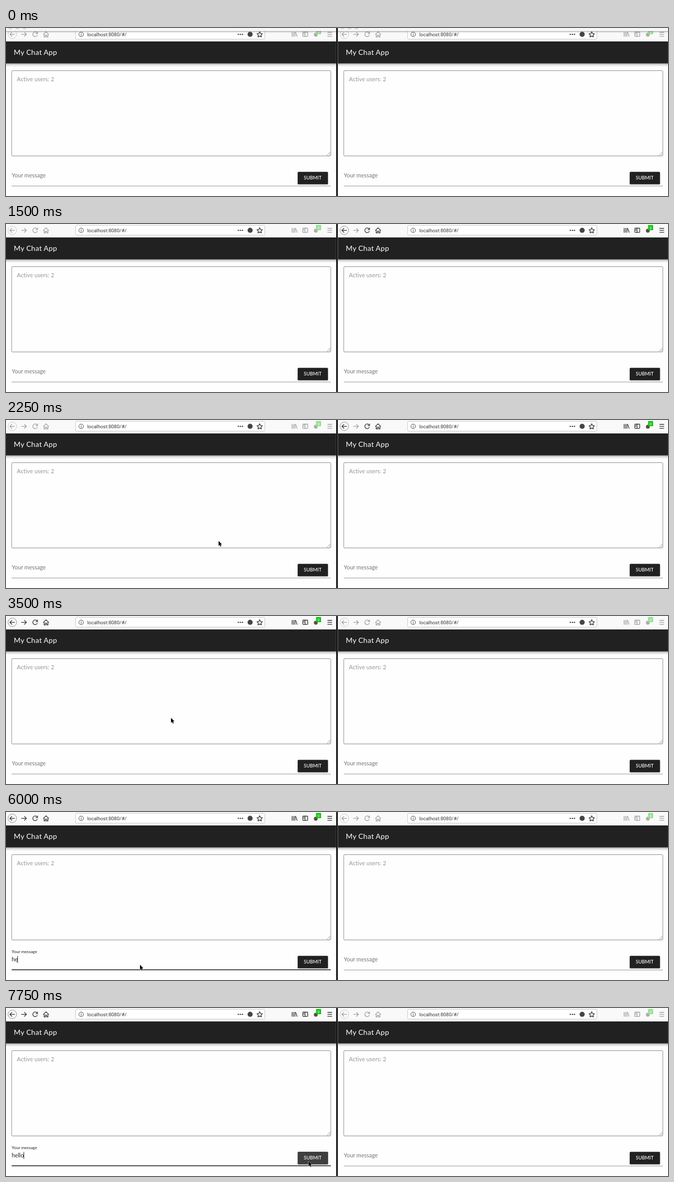
An HTML page that plays this animation: 1280x325 px, repeating every 8 s.

```html
<!DOCTYPE html>
<html lang="en">
<head>
<meta charset="utf-8">
<title>Chat app demo</title>
<style>
html, body { margin: 0; width: 100%; height: 100%; overflow: hidden; background: #fefefe; }
svg { display: block; width: 1280px; height: 325px; }
text { font-family: Lato, sans-serif; font-size: 11px; }
.line { fill: none; stroke: #333; stroke-width: 1.3; }
.title { font-size: 14px; letter-spacing: .3px; fill: #fff; }
.url { font-family: Roboto, sans-serif; font-size: 9.5px; fill: #333; }
.users { fill: #949494; letter-spacing: .1px; }
.label { fill: #757575; }
.submit { font-size: 9.2px; font-weight: 500; fill: #fff; text-anchor: middle; }

.anim { animation: 8s step-end infinite; }
.strip { animation-name: strip; }
.left-tools { animation-name: left-tools; }
.right-tools { animation-name: right-tools; }
.float { animation-name: float; }
.focus { animation-name: focus; transform-origin: 319.5px 0; }
.he { animation-name: he; }
.ll { animation-name: ll; }
.o { animation-name: o; }
.caret { animation-name: caret; }
.hover { animation-name: hover; }
.cursor { animation-name: cursor; }

@keyframes strip {
  0% { transform: none; }
  3.125% { transform: translateY(-3px); }
  6.25%, 100% { transform: translateY(-12px); }
}
@keyframes left-tools { 0% { opacity: .45; } 34.375%, 100% { opacity: 1; } }
@keyframes right-tools {
  0% { opacity: .45; }
  15.625% { opacity: 1; }
  34.375%, 100% { opacity: .45; }
}
@keyframes float {
  0% { transform: translate(11px, 289px); fill: #757575; }
  59.375% { transform: translate(11px, 279px) scale(.85); fill: #444; }
  62.5%, 100% { transform: translate(11px, 273px) scale(.75); fill: #212121; }
}
@keyframes focus {
  0% { transform: scaleX(0); }
  59.375% { transform: scaleX(.6); }
  62.5%, 100% { transform: none; }
}
@keyframes he { 0% { fill: transparent; } 75%, 100% { fill: #212121; } }
@keyframes ll { 0% { fill: transparent; } 78.125%, 100% { fill: #212121; } }
@keyframes o { 0% { fill: transparent; } 81.25%, 100% { fill: #212121; } }
@keyframes caret {
  0% { opacity: 0; transform: translateX(11px); }
  62.5% { opacity: 1; transform: translateX(11px); }
  75% { opacity: 1; transform: translateX(22px); }
  78.125% { opacity: 1; transform: translateX(28px); }
  81.25%, 100% { opacity: 1; transform: translateX(34px); }
}
@keyframes hover { 0% { opacity: 0; } 93.75%, 100% { opacity: 1; } }
@keyframes cursor {
  0% { opacity: 0; transform: translate(411px, 234px); }
  28.125% { opacity: 1; transform: translate(411px, 234px); }
  31.25% { opacity: 1; transform: translate(385px, 254px); }
  34.375% { opacity: 1; transform: translate(340px, 264px); }
  37.5% { opacity: 1; transform: translate(306px, 240px); }
  40.625% { opacity: 1; transform: translate(314px, 206px); }
  43.75% { opacity: 1; transform: translate(319px, 197px); }
  46.875% { opacity: 1; transform: translate(312px, 212px); }
  50% { opacity: 1; transform: translate(290px, 250px); }
  53.125% { opacity: 1; transform: translate(264px, 288px); }
  56.25% { opacity: 1; transform: translate(255.5px, 300.5px); }
  65.625% { opacity: 1; transform: translate(257.5px, 298px); }
  68.75% { opacity: 1; transform: translate(259px, 295.5px); }
  87.5% { opacity: 1; transform: translate(300px, 294px); }
  90.625% { opacity: 1; transform: translate(430px, 292px); }
  93.75% { opacity: 1; transform: translate(566px, 295px); }
  96.875%, 100% { opacity: 1; transform: translate(585px, 296.5px); }
}
</style>
</head>
<body>
<svg viewBox="0 0 1280 325">
  <defs>
    <linearGradient id="shade" x2="0" y2="1">
      <stop stop-opacity=".36"/>
      <stop offset=".4" stop-opacity=".12"/>
      <stop offset="1" stop-opacity="0"/>
    </linearGradient>

    <g id="window">
      <rect width="638.5" height="325" fill="#fefefe"/>
      <rect width="638.5" height="26" fill="#f9f9fa"/>
      <rect x="134.5" y="2.5" width="366" height="19" rx="2" fill="#fff" stroke="#c8c8c8"/>
      <circle class="line" cx="145.3" cy="12.3" r="4.4" style="stroke-width:.9"/>
      <path class="line" d="M145.3 9.6v1.1m0 1v3.2" style="stroke-width:1"/>
      <text class="url" x="157" y="16">localhost:8080/#/</text>
      <g fill="#444">
        <circle cx="449.2" cy="12.3" r="1.3"/>
        <circle cx="453.2" cy="12.3" r="1.3"/>
        <circle cx="457.2" cy="12.3" r="1.3"/>
        <circle cx="472" cy="12.2" r="4.9"/>
      </g>
      <path class="line" stroke-linejoin="round" d="M490.5 7.2l1.6 3.4 3.7.5-2.7 2.6.7 3.7-3.3-1.8-3.3 1.8.7-3.7-2.7-2.6 3.7-.5z"/>

      <rect y="26" width="638.5" height="42.5" fill="#212121"/>
      <rect y="68.5" width="638.5" height="7" fill="url(#shade)"/>
      <text class="title" x="15" y="52">My Chat App</text>

      <rect x="11" y="82.5" width="617" height="165" rx="2" fill="#fefefe" stroke="#8c8c8c"/>
      <path class="line" d="M620.5 246.5l7-7m-3 7l3-3" style="stroke:#777;stroke-width:.8"/>
      <text class="users" x="21" y="103">Active users: 2</text>

      <path d="M11 305.7H628" stroke="#949494"/>
      <rect x="563.5" y="279.5" width="59.5" height="24" rx="2" opacity=".22"/>
      <rect x="564" y="278.3" width="58.5" height="24" rx="1.5" fill="#212121"/>
      <text class="submit" x="593" y="293.2">SUBMIT</text>
    </g>

    <path id="forward" class="line" d="M29.5 12.3h10m-4.2-4.2l4.2 4.2-4.2 4.2"/>

    <g id="tools">
      <circle class="line" cx="12.2" cy="12.2" r="8.3" style="stroke:#777;stroke-width:.8"/>
      <path class="line" d="M17 12.3H7.5m4.2-4.2l-4.2 4.2 4.2 4.2"/>
      <path class="line" d="M60 9.6a4.5 4.5 0 1 0 .6 4M61 7.3v3.6h-3.6"/>
      <path class="line" d="M72 12.6l5.4-5.2 5.4 5.2m-9.1-1v5.7h2.5v-3.4h2.4v3.4h2.5v-5.7"/>
      <path class="line" d="M553.2 7.7v9m2.7-9v9m2.7-9v9m1.4-8.5l3 8.5"/>
      <rect class="line" x="573.8" y="8" width="9.6" height="8.4" rx="1.3"/>
      <path class="line" d="M578.2 8v8.4m-3-6h1.6m-1.6 2h1.6"/>
      <path class="line" d="M621.5 8.5h9m-9 3.8h9m-9 3.8h9"/>
      <circle cx="599" cy="13" r="3.7" fill="#5b4a40"/>
      <rect x="599.5" y="2" width="9.7" height="10" fill="#0fc40f"/>
      <text x="604.4" y="9.8" text-anchor="middle" fill="#fff" style="font:7.5px Roboto,sans-serif">0</text>
    </g>

    <g id="titlebar">
      <rect y="6" width="638.5" height="4" fill="url(#shade)"/>
      <rect width="638.5" height="6" fill="#f7f7f7"/>
      <g fill="#d6d6d6">
        <circle cx="8.5" cy="-1.5" r="4"/>
        <circle cx="22" cy="-1.5" r="4"/>
        <circle cx="35.5" cy="-1.5" r="4"/>
      </g>
    </g>
  </defs>

  <use href="#window"/>
  <g class="anim left-tools"><use href="#tools"/><use href="#forward"/></g>

  <g transform="translate(642)">
    <use href="#window"/>
    <g class="anim right-tools"><use href="#tools"/></g>
    <use href="#forward" opacity=".45"/>
    <text class="label" x="11" y="289">Your message</text>
  </g>

  <text class="label anim float">Your message</text>
  <path class="anim focus" d="M11 305.3H628" stroke="#212121" stroke-width="1.6"/>
  <text x="11" y="288.5"><tspan class="anim he">he</tspan><tspan class="anim ll">ll</tspan><tspan class="anim o">o</tspan></text>
  <rect class="anim caret" y="278.5" width="1" height="13.5" fill="#212121"/>

  <g class="anim hover">
    <rect x="564" y="278.3" width="58.5" height="24" rx="1.5" fill="#3f3f3f"/>
    <text class="submit" x="593" y="293.2">SUBMIT</text>
  </g>

  <g class="anim strip">
    <use href="#titlebar"/>
    <use href="#titlebar" x="642"/>
  </g>
  <rect x="638.5" width="3" height="325"/>

  <path class="anim cursor" d="M0 0V9.4L2.1 7.4 3.7 11 5.3 10.3 3.8 6.8H6.7Z" stroke="#fff" stroke-width="1" paint-order="stroke"/>
</svg>
</body>
</html>
```
